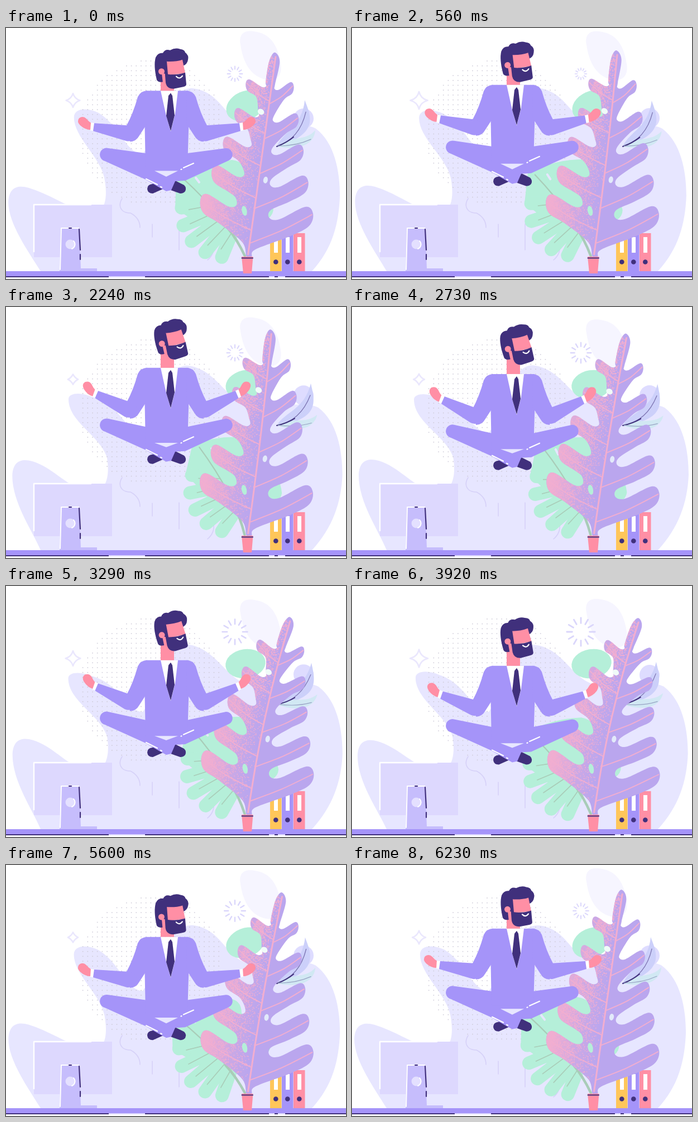
An HTML page with a canvas that plays this animation: 609 px wide and 449 px high, repeating every 6.3 s.

```html
<!DOCTYPE html>
<html lang="en">
<head>
<meta charset="utf-8">
<title>Office meditation</title>
<style>
html, body { margin: 0; width: 100%; height: 100%; overflow: hidden; background: #fff; }
canvas { display: block; }
</style>
</head>
<body>
<canvas id="stage" width="609" height="449"></canvas>
<script>
const ctx = document.getElementById('stage').getContext('2d');
const LOOP = 6300, STEP = 70;
const PURPLE = '#a594f9', DARK = '#40307c', PINK = '#ff8fa5', GREEN = '#b5efd9';
const MIST = '#e7e6ff', LILAC = '#ddd8fe', LEAF = '#baa6ee', ROSE = '#f2aed0', VEIN = '#a9ccb8';
let t = 0;

const wave = peak => Math.cos(2 * Math.PI * (t - peak) / LOOP);
const lerp = (a, b, k) => a + (b - a) * k;
const shape = d => d instanceof Path2D ? d : new Path2D(d);
const fill = (d, color) => { ctx.fillStyle = color; ctx.fill(shape(d)); };
const line = (d, color, width = 2) => {
  ctx.strokeStyle = color;
  ctx.lineWidth = width;
  ctx.stroke(shape(d));
};
const rect = (x, y, w, h, color) => { ctx.fillStyle = color; ctx.fillRect(x, y, w, h); };
const oval = (x, y, rx, ry, color, angle = 0) => {
  ctx.fillStyle = color;
  ctx.beginPath();
  ctx.ellipse(x, y, rx, ry, angle, 0, 7);
  ctx.fill();
};
const group = (draw, { dx = 0, dy = 0, angle = 0, x = 0, y = 0 }) => {
  ctx.save();
  ctx.translate(x + dx, y + dy);
  ctx.rotate(angle * Math.PI / 180);
  ctx.translate(-x, -y);
  draw();
  ctx.restore();
};

// Catmull-Rom curve through the points
function smooth(pts, closed) {
  const n = pts.length, path = new Path2D();
  const at = i => closed ? pts[(i + n) % n] : pts[Math.max(0, Math.min(n - 1, i))];
  path.moveTo(...pts[0]);
  for (let i = 0; i < (closed ? n : n - 1); i++) {
    const [a, b, c, d] = [at(i - 1), at(i), at(i + 1), at(i + 2)];
    path.bezierCurveTo(b[0] + (c[0] - a[0]) / 6, b[1] + (c[1] - a[1]) / 6,
      c[0] - (d[0] - b[0]) / 6, c[1] - (d[1] - b[1]) / 6, c[0], c[1]);
  }
  return path;
}

let seed = 7;
const random = () => (seed = seed * 16807 % 2147483647) / 2147483647;

// ---------- backdrop ----------
function backdrop() {
  const k = 0.5 + 0.5 * wave(2850), a = 8 * k, b = -11 * k, c = 5 * k;
  fill(`M62,435 C${40 + a},400 ${4 + a},350 ${4 + a},${312 + b}
    C${5 + a},${284 + b} ${22 + a},${281 + b} ${40 + a},${286 + b}
    C${76 + a},${297 + b} 105,317 140,329 C182,340 ${182 + c},300 ${176 + c},268
    C168,230 ${122 + b},${195 - b} ${122 + b},${160 - b / 2}
    C${122 + b},${143 - b} ${145 + b},${142 - b} ${165 + b},${151 - b}
    C205,175 215,225 245,225 C275,190 ${290 + b},105 ${335 + b},${108 + b / 3}
    C${385 + b},${114 + b / 3} 390,160 430,175 C470,185 530,165 ${555 + c},180
    C${588 + c},205 ${598 + c},255 ${598 + c},300 C${596 + c},350 585,395 548,435Z`, MIST);

  group(() => fill('M420,30 C416,8 430,3 448,7 C478,12 488,38 492,64 C496,90 480,96 463,92 C435,84 424,58 420,30Z',
    '#f6f5ff'), { dy: 9 - 9.5 * wave(250) });

  for (let y = 59; y < 320; y += 8.7)
    for (let x = 137.6; x < 388; x += 8.7)
      if (Math.hypot(x - 262, y - 187) < 131) rect(x - 0.8, y - 0.8, 1.6, 1.6, '#cfccd9');

  const r = 17.5 + 8 * wave(4200);
  for (let i = 0; i < 12; i++)
    group(() => line(`M410,${82 - r}V${82 - r * 0.62}`, '#dad6fb', 0.8 + r * 0.08), { x: 410, y: 82, angle: i * 30 });

  const s = 12.5 + 3.5 * Math.cos(4 * Math.PI * (t - 800) / LOOP);
  group(() => line(`M0,${-s} Q3,-3 ${s},0 Q3,3 0,${s} Q-3,3 ${-s},0 Q-3,-3 0,${-s}Z`, '#eae7fd', 2.6),
    { dx: 120, dy: 129.5 });

  line('M208,305 Q200,318 209,327 Q214,331 223,331 Q240,340 240,357 M262,351V374 M310,350V397 M372,388 Q374,404 361,415',
    '#d6d1f8', 1.6);
}

// ---------- desk ----------
function desk() {
  rect(50, 316, 140, 94, LILAC);
  line('M50,400V316H152', '#fff', 2.4);
  fill('M98,358H131L134,430H163V435H96Z', '#c6bdfc');
  line('M97,432L99,358H130', '#fff', 2);
  line('M131,360L133,397M133,405V414M113,358H117', DARK, 2.2);
  oval(115, 387, 8.5, 8.5, '#e4e0ff');
  line('M121,381A8.5,8.5 0 0 1 118,395', '#fff', 2);
  rect(0, 435, 609, 9, PURPLE);
  rect(0, 444, 609, 2, LILAC);
  for (const [x, w] of [[0, 184], [249, 222], [481, 6], [500, 109]]) rect(x, 444, w, 2, DARK);
  ['#ffc65a', PURPLE, PINK].forEach((color, i) => {
    const x = 473 + 21 * i;
    rect(x, 367, 20.5, 68, color);
    rect(x + 7, 374, 7, 28, '#fff');
    oval(x + 10.3, 418.5, 4.3, 4.3, DARK);
  });
}

// ---------- small plants ----------
function fanLeaf() {
  fill('M303,322 L305,268 Q350,240 405,236 Q432,240 430,265 Q470,290 479,322 Q480,345 440,350 L395,385Z', GREEN);
  for (let i = 0; i < 5; i++) {
    const angle = (186 - 23 * i) * Math.PI / 180, root = `${lerp(365, 405, i / 4)},${lerp(318, 365, i / 4)}`;
    const x = 392 + 78 * Math.cos(angle), y = 330 + 80 * Math.sin(angle);
    line(`M${root}L${x},${y}`, GREEN, 24);
    line(`M${root}L${lerp(380, x, 0.8)},${lerp(338, y, 0.8)}`, VEIN, 1.6);
  }
  line('M340,268L346,276', MIST, 4);
  line('M428,408Q395,340 318,270', VEIN, 2.2);
  line('M428,408Q414,378 396,356', VEIN, 4.5);
}

function greenery() {
  oval(429, 139, 36, 26, GREEN, -0.28 + 0.14 * wave(3300));
  group(fanLeaf, { x: 430, y: 405, angle: 3.75 + 7.5 * wave(2100) });

  oval(533, 160 - 2 * wave(2800), 18, 18, '#dedcff');
  group(() => {
    fill('M485,212 C496,185 530,178 535,129 C546,158 562,190 485,212Z', '#ccd0fa');
    fill('M485,212 C510,192 535,204 554,183 C552,206 530,220 485,212Z', '#d1e8f3');
    line('M485,212 Q526,198 537,150', '#7d75b2', 1.3);
    line('M485,212 Q503,205 515,195', DARK, 2);
    line('M487,211 Q520,211 546,199', '#98a3c4', 1.2);
  }, { x: 485, y: 212, angle: 4.5 + 4.5 * wave(2950) });
}

// ---------- big leaf ----------
const ribX = y => 433 + (409 - y) * 0.142;
// One lobe from its lower edge around the tip to the notch above it, relative to the tip
const LOBE = [[-40, 34], [-7, 16], [0, -6], [-14, -18], [-60, 4], [-78, 2], [-76, -12]];

// Five lobes up one side, each smaller than the one below
function lobes(dir, tipAt, size, shrink) {
  const edge = [], veins = [];
  for (let i = 0; i < 5; i++) {
    const [x, y] = tipAt(i), sx = dir * (size - shrink * i), sy = 1 - 0.1 * i;
    edge.push(...LOBE.map(([u, v]) => [x + u * sx, y + v * sy]));
    const root = y + 47 * sy, rx = ribX(root);
    veins.push([[rx, root], [(rx + x) / 2, (root + y) / 2 + 1], [x - 2 * dir, y - 4]]);
  }
  return { edge, veins };
}
const right = lobes(1, i => [550 - 8.5 * i, 338 - 57.5 * i], 1, 0.14);
const left = lobes(-1, i => [348 + 20.5 * i, 315 - 53 * i], 0.83, 0.09);
const leafEdge = [[431, 409], [440, 409], [447, 396], ...right.edge, [491, 60], [482, 44], [472, 60],
  ...left.edge.reverse(), [423, 383]];
const leafVeins = [...right.veins, ...left.veins, [405, 320, 230, 140, 52].map(y => [ribX(y), y])];

const speckles = [];
for (let i = 0; i < 7000; i++) {
  const y = 50 + random() * 335, u = random() * 1.2;
  if (random() < u * 1.1) speckles.push([ribX(y) - u * (20 + (y - 45) * 0.22), y]);
}

// Horizontal shift of the leaf tip: quick swing right, slow return
function tipShift() {
  const low = 1700, high = 3700, s = (t - low + LOOP) % LOOP, rise = high - low;
  const p = s < rise ? s / rise : 1 + (s - rise) / (LOOP - rise);
  return 7 - 24 * Math.cos(Math.PI * p);
}

function bigLeaf() {
  const shift = tipShift();
  const bend = ([x, y]) => {
    const h = (409 - y) / 365, dx = shift * h * h;
    return [x + dx, y + 1.6 * (x - 433) * shift * h / 365 + 0.22 * dx * h];
  };
  const outline = smooth(leafEdge.map(bend), true);
  fill(outline, LEAF);

  ctx.save();
  ctx.clip(outline);
  const blush = ctx.createLinearGradient(...bend([455, 230]), ...bend([372, 218]));
  blush.addColorStop(0, 'rgba(242,174,208,0)');
  blush.addColorStop(0.45, 'rgba(242,174,208,.3)');
  blush.addColorStop(1, 'rgba(242,174,208,.95)');
  rect(330, 30, 230, 380, blush);
  for (const p of speckles) rect(...bend(p), 1.5, 1.5, ROSE);
  ctx.restore();

  for (const vein of leafVeins) line(smooth(vein.map(bend)), ROSE, vein.length > 3 ? 3 : 1.9);
  oval(...bend([457, 150]), 6, 5, '#f0fbf8', 0.6);
  oval(...bend([465, 272]), 4, 6, '#e2eafa', 0.2);
  oval(...bend([427, 327]), 4.5, 9, GREEN, -0.2);

  fill('M422,409H442.5L440,439H425Z', PINK);
  line('M422.5,411.5H442', DARK, 2);
}

// ---------- man ----------
function arm() {
  fill('M253,112 Q241,112 236,123 Q228,152 216,174 L222,203 Q233,203 239,192 L252,172Z', PURPLE);
  group(() => {
    fill('M153,170 Q148,167 144,162 Q138,156 131,161 Q126,167 133,174 Q142,182 152,182Z', PINK);
    fill('M152,169 L159,170 L157,184 L151,183Z', '#fff');
    fill('M158,170 L218,174 Q236,176 234,190 Q229,204 216,202 L156,184Z', PURPLE);
  }, { x: 224, y: 188, angle: 7.8 + 8.5 * wave(2750) });
}

function torso() {
  fill('M250,112H327L328,150L325,250H250L248,150Z', PURPLE);
  arm();
  ctx.save();
  ctx.translate(576, 0);
  ctx.scale(-1, 1);
  arm();
  ctx.restore();
  fill('M277,112H308L303,153L295,185L287,157Z', '#fff');
  fill('M277,80H301V112H277Z', PINK);
  fill('M295,116L298,121L302,156L295,184L287,157L291,121Z', DARK);
}

function head() {
  fill(`M270,92 Q264,66 268,52 Q272,43 281,44 Q285,36 294,39 Q303,34 312,37 Q320,38 321,43
    Q328,48 326,56 Q325,64 317,67 L300,82 L284,95 Q273,98 270,92Z`, DARK);
  fill('M287,59 Q304,60 316,56 L321,80 L289,84Z', PINK);
  fill('M279,80 L285,81 L288,99 L281,98Z', PINK);
  oval(278.5, 77, 5.5, 5.5, PINK);
  fill('M283,58 L288,59 L290,82 Q305,84 321,79 L323,100 Q323,104 315,105 L300,108 Q288,108 286,97Z', DARK);
  line('M305,86 Q311,92 316,85', '#fff', 2.2);
}

function man() {
  const legs = { dy: 3.2 + 26 * wave(4600) }, hip = 3 + 3 * wave(2850);
  group(() => {
    fill('M262,279 Q253,280 253,288 Q254,296 263,296 L281,288 L274,277Z', DARK);
    fill('M303,273 L319,281 Q324,286 321,292 Q318,296 312,296 L295,290Z', DARK);
    fill(`M183,215 L250,${224 + hip} H325 L394,215 A11.5,11.5 0 0 1 399,237 L321,273 L303,274
      L296,290 L287,292 L276,286 L250,271 L177,238 A11.5,11.5 0 0 1 183,215Z`, PURPLE);
  }, legs);
  group(torso, { dy: 9 + 24 * wave(4350) });
  group(() => {
    const y = 255.5 + hip / 2;
    fill(`M266,${y}H308L287,266Z`, MIST);
    line(`M318,${250 + hip}l18,-8M313.5,${253 + hip}l1,-.4M251,270l20,10M277,284l2,1`, '#fff', 2.2);
  }, legs);
  group(head, { x: 289, y: 72, dy: 3.6 + 23 * wave(4600), angle: -3.2 - 4 * wave(2500) });
}

function frame() {
  t = Math.floor(performance.now() % LOOP / STEP) * STEP;
  ctx.clearRect(0, 0, 609, 449);
  ctx.lineCap = 'round';
  ctx.lineJoin = 'round';
  backdrop();
  desk();
  greenery();
  bigLeaf();
  man();
  requestAnimationFrame(frame);
}
frame();
</script>
</body>
</html>
```
